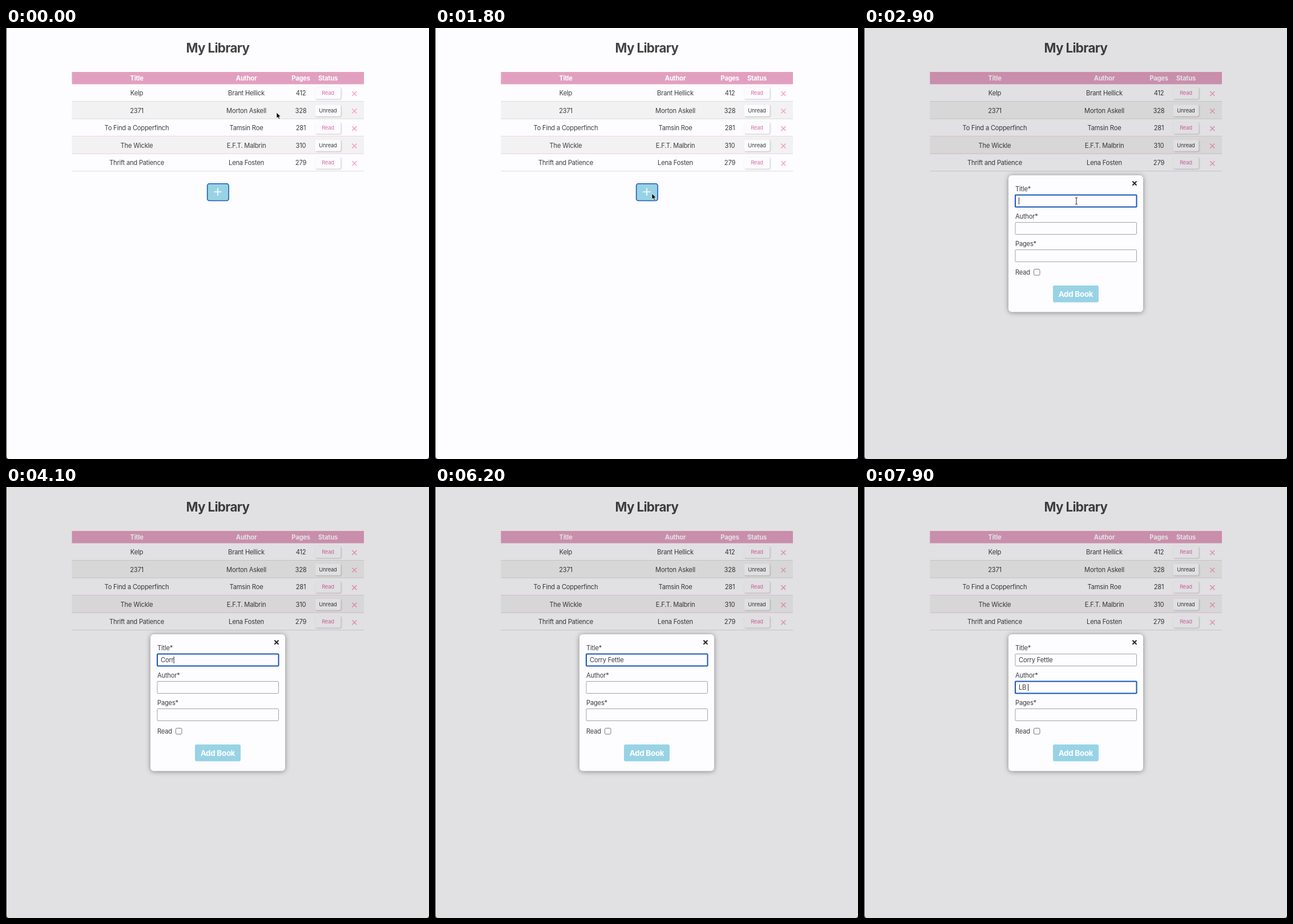
These frames come from a looping animation (741 by 755 pixels, 8 s). An HTML page:

```html
<!DOCTYPE html>
<html lang="en">
<head>
<meta charset="utf-8">
<title>My Library</title>
<style>
  html, body { margin: 0; height: 100%; overflow: hidden; background: #333; }
  svg { display: block; width: 741px; height: 755px; }
  text { font: 11.2px Inter, "Open Sans", sans-serif; letter-spacing: -.02em; fill: #3e3e40; white-space: pre; }
  .mid { text-anchor: middle; }
  .bold { font-weight: 700; fill: #fff; }
  .title { font-size: 22.4px; letter-spacing: -.03em; fill: #444; }
  .small { font-size: 9.4px; }
  .read { fill: #dc6fae; }
  .add { font-size: 13.4px; }
  .button { fill: #fcfbfd; filter: drop-shadow(1px 1px 1px rgba(0,0,0,.22)); }
  .delete { stroke: #f4a3c0; stroke-width: 1.5; }
  .field { fill: #fdfcff; stroke: #a3a3a6; }
  .focus { stroke: #1558b5; stroke-width: 2; }
  .card { fill: #fdfcff; filter: drop-shadow(0 1px 4px rgba(0,0,0,.4)); }
</style>
</head>
<body>
<svg viewBox="0 0 741 755">
  <path id="page" d="M1 0H741V750Q741 755 736 755H6Q1 755 1 750Z" fill="#fdfcfe"/>
  <text class="mid bold title" x="371" y="42.5">My Library</text>
  <path d="M115.5 77H627V98.5H115.5Z" fill="#e2a0c0"/>
  <g id="table"></g>
  <rect x="352.7" y="272.7" width="37.4" height="29.8" rx="3.5" fill="#98d3e5" stroke="#1c5cbb" stroke-width="1.6"/>
  <path d="M364.5 287H377.5M371 280.5V293.5" stroke="#fff" stroke-width="1.6"/>

  <g id="modal">
    <use href="#page" style="filter:brightness(0)" opacity=".107"/>
    <rect class="card" x="253" y="258" width="236" height="239.5" rx="6"/>
    <rect id="closeRing" class="focus" x="465" y="262" width="18" height="18.5" rx="4" fill="#fff"/>
    <path d="M470.4 268.6l7 7m0-7l-7 7" stroke="#111" stroke-width="1.9"/>
    <g id="form"></g>
    <text x="265" y="432">Read</text>
    <rect x="297.5" y="422.5" width="10.5" height="10.5" rx="2" fill="#fff" stroke="#77777a"/>
    <rect x="331" y="451" width="80" height="29.5" rx="3" fill="#98d3e5"/>
    <text class="mid bold add" x="371" y="471">Add Book</text>
    <path id="caret" d="M0 0V12" stroke="#222"/>
  </g>

  <g id="pointer">
    <path id="arrow" d="M0 0V10L2.3 8 3.9 11.6 5.6 10.8 4 7.3H7.2Z" fill="#000" stroke="#fff" stroke-width=".7"/>
    <path id="beam" d="M-2 -6Q0 -6 0 -4.5Q0 -6 2 -6M0 -4.5V4.5M-2 6Q0 6 0 4.5Q0 6 2 6" fill="none" stroke="#222"/>
  </g>
</svg>
<script>
const $ = id => document.getElementById(id);
const label = (x, y, s, cls) => `<text class="${cls}" x="${x}" y="${y}">${s}</text>`;
const columns = [229, 421, 516.5, 564];

const books = [
  ['Kelp', 'Brant Hellick', 412, 'Read'],
  ['2371', 'Morton Askell', 328, 'Unread'],
  ['To Find a Copperfinch', 'Tamsin Roe', 281, 'Read'],
  ['The Wickle', 'E.F.T. Malbrin', 310, 'Unread'],
  ['Thrift and Patience', 'Lena Fosten', 279, 'Read']
];

function row(book, i) {
  const top = 98.5 + i * 30.55, mid = top + 15.5;
  const line = i == 2 || i == 3 ? '#edcfe9' : '#dcdade';
  return `<rect x="115.5" y="${top}" width="511.5" height="30.5" fill="${i % 2 ? '#f2f2f2' : 'none'}"/>
    <path d="M115.5 ${top + 30}H627" stroke="${line}"/>
    <rect class="button" x="541.5" y="${mid - 10.2}" width="45" height="20.4" rx="3"/>
    <path class="delete" d="M606.3 ${mid - 3}l8 8m0-8l-8 8"/>` +
    book.map((s, c) => label(columns[c], mid + (c == 3 ? 3.2 : 4), s,
      c < 3 ? 'mid' : 'mid small ' + s.toLowerCase())).join('');
}

$('table').innerHTML =
  ['Title', 'Author', 'Pages', 'Status'].map((s, i) => label(columns[i], 92, s, 'mid bold')).join('') +
  books.map(row).join('');

const fieldTop = i => 292.5 + i * 48;
$('form').innerHTML = ['Title*', 'Author*', 'Pages*'].map((s, i) =>
  label(265, fieldTop(i) - 6.5, s, '') +
  `<rect class="field" x="265" y="${fieldTop(i)}" width="212.5" height="21" rx="1"/>` +
  `<text class="value" x="271" y="${fieldTop(i) + 14.5}"></text>`).join('');
const fields = document.querySelectorAll('.field');
const values = document.querySelectorAll('.value');

// Text typed into each field: focus time, first key, then one key every 200 ms
const entries = [
  { text: 'Corry Fettle', focus: 2700, start: 3500 },
  { text: 'LB ', focus: 6600, start: 7400 }
];
const typed = (e, t) => Math.max(0, Math.min(e.text.length, Math.floor((t - e.start) / 200) + 1));

const ease = (t, a, b) => {
  const p = Math.max(0, Math.min(1, (t - a) / (b - a)));
  return p * p * (3 - 2 * p);
};
const show = (el, on) => el.setAttribute('visibility', on ? 'inherit' : 'hidden');

function draw(t) {
  show($('modal'), t >= 1900);
  show($('closeRing'), t < 2700);

  const active = t < 2700 ? -1 : t < 6600 ? 0 : 1;
  fields.forEach((f, i) => f.classList.toggle('focus', i == active));
  entries.forEach((e, i) => values[i].textContent = e.text.slice(0, typed(e, t)));

  const e = entries[active];
  if (e) {
    const n = typed(e, t);
    const since = t - (n ? e.start + (n - 1) * 200 : e.focus);
    const x = 271.5 + (n ? values[active].getComputedTextLength() : 0);
    $('caret').setAttribute('transform', `translate(${x} ${fieldTop(active) + 4.5})`);
    show($('caret'), since % 1000 < 500);
  } else show($('caret'), false);

  const go = ease(t, 0, 1100), down = ease(t, 2200, 2600);
  const x = 474 - 94 * go - 8 * down, y = 148 + 142 * go + 13 * down;
  $('pointer').setAttribute('transform', `translate(${x} ${y})`);
  show($('pointer'), t < 3500);
  show($('arrow'), y < 293);
  show($('beam'), y >= 293);
}

function tick() {
  draw(Math.floor(performance.now() % 8000 / 100) * 100);
  requestAnimationFrame(tick);
}
tick();
</script>
</body>
</html>
```
